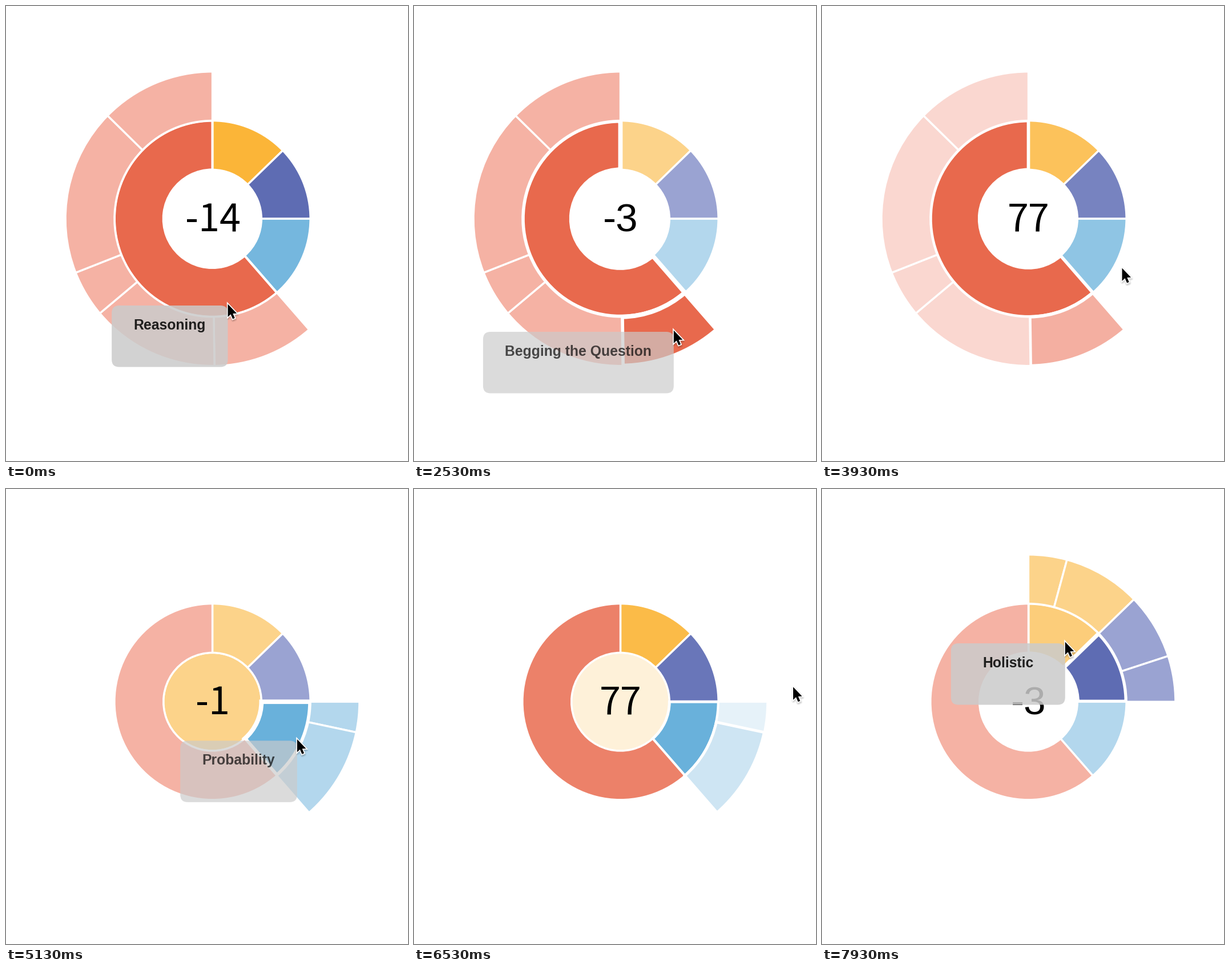
Recreate the animation shown at these times as a matplotlib script. Size 704 by 796 pixels, loop 8 s.

```python
import numpy as np
import matplotlib.pyplot as plt
from matplotlib.animation import FuncAnimation
from matplotlib.colors import to_rgb
from matplotlib.patches import Circle, FancyBboxPatch, Polygon, Wedge

W, H, DPI = 704, 796, 100
FRAMES, LOOP = 120, 8000
PX = 72 / DPI
CX, CY, R = 361.5, 372.2, 85.8
THIN, WIDE = 3.4, 7.8

# full and dimmed colour of each family
COLORS = {
    "yellow": ("#fbaf28", "#fcd38a"),
    "purple": ("#5261ad", "#9aa3d2"),
    "blue": ("#69b1db", "#b3d7ed"),
    "red": ("#e8694d", "#f5b2a4"),
}
# clockwise angles from the top; neighbours share a limit
ANGLES = {
    "yellow": (0, 15.2, 45.9),
    "purple": (45.9, 71.9, 90),
    "blue": (90, 102, 138.9),
    "red": (138.9, 179.2, 230, 248.5, 314.5, 360),
}

# start frame, duration, hovered node, centre value
EVENTS = [
    (-2.4, 7, "red", "-14"),
    (15, 6, "red0", "-3"),
    (50.6, 15, None, "77"),
    (63, 7, "blue", "-1"),
    (79.5, 7, "blue1", "-1"),
    (88.5, 15, None, "77"),
    (107, 6, "purple", "-3"),
    (115.6, 7, "yellow", "-3"),
]
LABELS = {
    "red": "Reasoning",
    "red0": "Begging the Question",
    "blue": "Probability",
    "blue1": "Conjunction Fallacy",
    "purple": "Linguistic",
    "yellow": "Holistic",
}
# frames at which the pointer slips off the chart
LEAVES = {"red0": 46, "blue1": 85.5}

# pointer path: frame, x, y
PATH = np.array([
    (0, 388, 521), (6, 380, 509), (12, 374, 515), (16, 371, 549),
    (21, 380, 577), (28, 380, 577), (35, 432, 573), (41, 499, 555),
    (46, 501, 521), (51, 522, 487), (55, 522, 470), (59, 526, 454),
    (63, 503, 438), (70, 508, 432), (74, 508, 432), (77, 510, 440),
    (80, 497, 479), (83, 530, 476), (85, 580, 440), (87, 653, 378),
    (92, 671, 350), (98, 662, 345), (101, 648, 345), (107, 530, 347),
    (113, 492, 346), (115.5, 446, 292), (119, 417, 257),
])
ARROW = np.array([(0, 0), (0, 22.5), (5, 17.8), (8.6, 26), (12.2, 24.4),
                  (8.8, 16.5), (15.6, 16.3)])


def ease(u):
    u = min(max(u, 0), 1)
    return 4 * u ** 3 if u < 0.5 else 1 - 4 * (1 - u) ** 3


def mix(a, b, u):
    return tuple(np.array(a) * (1 - u) + np.array(b) * u)


def pointer(k):
    return tuple(np.interp(k, PATH[:, 0], PATH[:, i]) for i in (1, 2))


def family(name):
    return name.rstrip("0123456789") if name else None


def shade(fam, level):
    """0 is white, 1 the dimmed colour, 2 the full colour."""
    full, dim = map(to_rgb, COLORS[fam])
    return mix((1, 1, 1), dim, level) if level < 1 else mix(dim, full, level - 1)


def state(name, k):
    """Level and stroke emphasis of a node at frame k."""
    fam = family(name)
    inner = name in COLORS
    level, glow = (2.0 if inner else 0.0), 0.0
    for i, (start, span, hover, _) in enumerate(EVENTS):
        if k < start:
            break
        end = EVENTS[i + 1][0] if i + 1 < len(EVENTS) else FRAMES
        p = ease((min(k, end) - start) / span)
        active = hover is not None and (name == hover or name == family(hover))
        if name == "root":
            target = 1 if family(hover) == "blue" else 0
        elif hover is None:
            target = 2 if inner else 0
        elif active:
            target = 2
        elif inner:
            target = 1
        elif fam == family(hover):
            level = max(level, 1)
            target = 1
        else:
            target = min(1, round(level))
        level += (target - level) * p
        glow += (active - glow) * p
    return level, glow


fig = plt.figure(figsize=(W / DPI, H / DPI), dpi=DPI, facecolor="white")
ax = fig.add_axes([0, 0, 1, 1])
ax.set_xlim(0, W)
ax.set_ylim(H, 0)
ax.axis("off")


def add_node(name, a0, a1, ring):
    w = Wedge((CX, CY), R * (ring + 1), a0 - 90, a1 - 90, width=R,
              ec="white", zorder=ring + 1)
    nodes[name] = ax.add_patch(w)


nodes = {"root": ax.add_patch(Circle((CX, CY), R, ec="white", zorder=1))}
for fam, limits in ANGLES.items():
    add_node(fam, limits[0], limits[-1], 1)
for fam, limits in ANGLES.items():
    for j in range(len(limits) - 1):
        add_node(f"{fam}{j}", limits[j], limits[j + 1], 2)

count = ax.text(362, 394.5, "", ha="center", va="baseline", color="black", zorder=5)
box = ax.add_patch(FancyBboxPatch((0, 0), 200, 107.5, fc="#cbcbcb", ec="none",
                                  boxstyle="round,pad=0,rounding_size=13", zorder=6))
label = ax.text(0, 0, "", ha="center", va="baseline", color="black", zorder=7,
                family="Liberation Sans", weight="bold", size=24.8 * PX)

shadows = [ax.add_patch(Polygon(ARROW, fc="black", ec="black", alpha=0.06,
                                lw=w * PX, joinstyle="round", zorder=8))
           for w in (3, 5, 7)]
arrow = ax.add_patch(Polygon(ARROW, fc="black", ec="none", zorder=10))
rim = ax.add_patch(Polygon(ARROW, fc="white", ec="white", lw=3.4 * PX,
                           joinstyle="miter", zorder=9))


def draw_chart(k):
    for name, patch in nodes.items():
        level, glow = state(name, k)
        patch.set_visible(level > 0.01)
        patch.set_facecolor(shade("yellow" if name == "root" else family(name), level))
        patch.set_linewidth((THIN + (WIDE - THIN) * glow) * PX)


def draw_count(k, value):
    count.set_text(value)
    if value == "-3":
        count.set(family="Liberation Sans", size=69 * PX)
    else:
        count.set(family="Noto Sans CJK JP", size=66.5 * PX)


def draw_tip(k, now):
    start, _, hover, _ = EVENTS[now]
    fade = 1
    if hover is None:
        fade = max(0, 1 - (k - start) / 6)
        start, _, hover, _ = EVENTS[now - 1]
    alpha = fade * np.interp(k - start, [3.4, 6], [0.85, 0.68])
    x, y = pointer(min(k, LEAVES.get(hover, k)))
    label.set_text(LABELS[hover])
    width = max(200, label.get_window_extent().width + 77)
    right, top = x + 0.5, y + 3
    box.set_bounds(right - width, top, width, 107.5)
    label.set_position((right - width / 2, top + 42))
    for part in (box, label):
        part.set_alpha(alpha)
        part.set_visible(alpha > 0.01)


def draw_pointer(k):
    tip = np.array(pointer(k)) + (0.5, 0.5)
    for part in (arrow, rim):
        part.set_xy(ARROW + tip)
    for part in shadows:
        part.set_xy(ARROW + tip + (0.5, 2))


def update(k):
    now = max(i for i, e in enumerate(EVENTS) if e[0] <= k)
    value = EVENTS[now][3]
    if k > LEAVES.get(EVENTS[now][2], FRAMES):
        value = "77"
    draw_chart(k)
    draw_count(k, value)
    draw_tip(k, now)
    draw_pointer(k)
    return []


anim = FuncAnimation(fig, update, frames=FRAMES, interval=LOOP / FRAMES,
                     init_func=lambda: update(0), repeat=True, repeat_delay=0)
plt.show()
```
